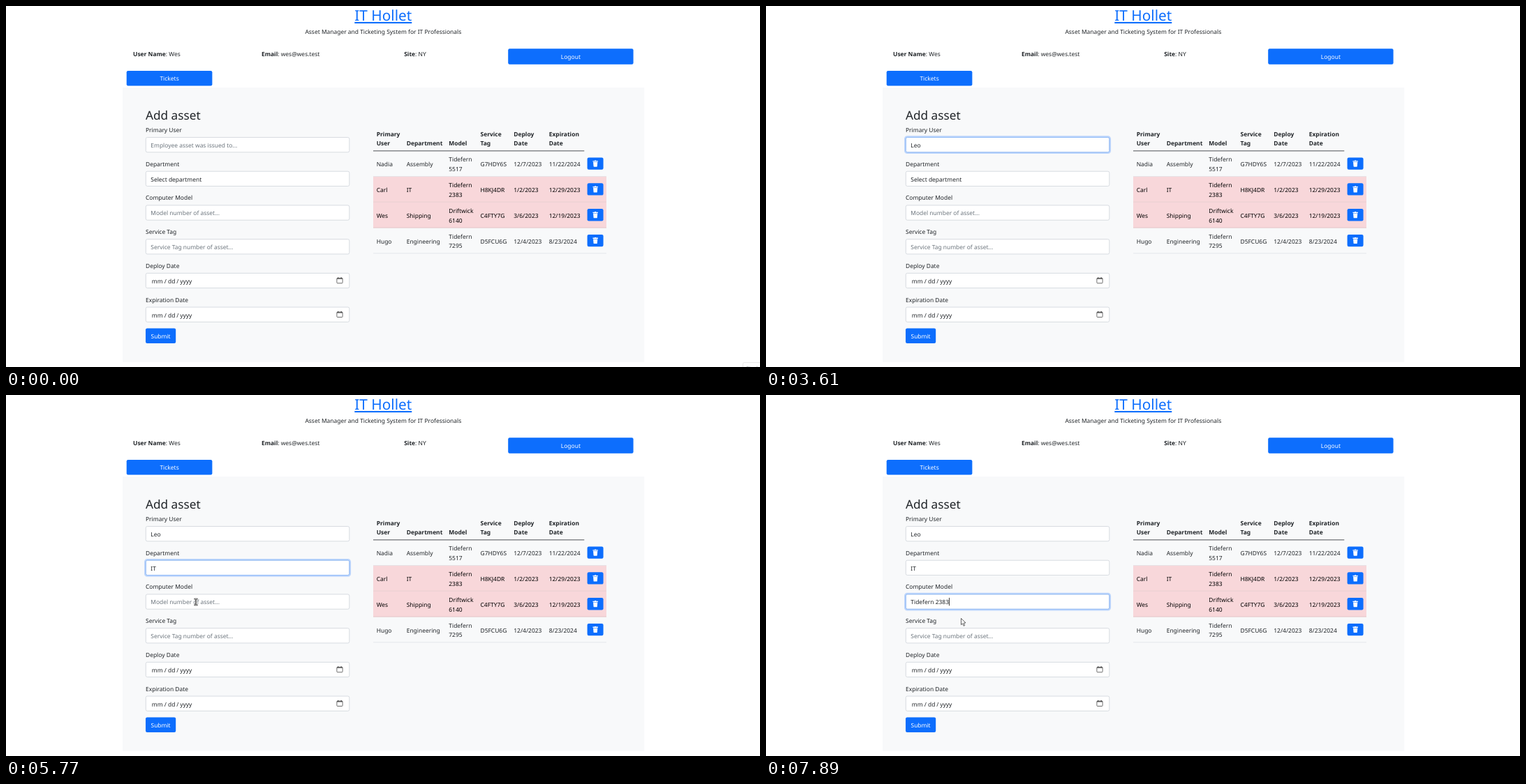
An HTML page for the animation above (8 s loop, 1080 px wide and 518 px high).

```html
<!DOCTYPE html>
<html lang="en">
<head>
<meta charset="utf-8">
<title>Asset form</title>
<style>
  html, body { margin: 0; width: 100%; height: 100%; overflow: hidden; background: #fff; }
  svg { display: block; width: 100vw; height: 100vh; }
  text { font: 8.45px "Noto Sans", "Open Sans", sans-serif; fill: #212529; text-rendering: geometricPrecision; white-space: pre; }
  .bold { font-weight: 700; }
  .mid { text-anchor: middle; }
  .white { fill: #fff; }
  .hint { fill: #6c757d; }
  .black { fill: #000; }
  .title { font-size: 20.8px; fill: #0d6efd; text-decoration: underline; }
  .heading { font-size: 17.2px; }
  .button { fill: #0d6efd; }
  .box { fill: #fff; stroke: #ced4da; stroke-width: .8; }
  .ring rect { fill: none; }
</style>
</head>
<body>
<svg id="stage" viewBox="0 0 1080 518" preserveAspectRatio="none"></svg>
<script>
const LOOP = 8000;
const TYPED_NAME = 'Leo';
const PICKED_MODEL = 'Tidefern 2383';
const stage = document.getElementById('stage');

const text = (x, y, content, cls = '', id = '') =>
  `<text x="${x}" y="${y}" class="${cls}" id="${id}">${content}</text>`;
const rect = (x, y, w, h, attrs = '') =>
  `<rect x="${x}" y="${y}" width="${w}" height="${h}" ${attrs}/>`;
const line = (x1, x2, y, color, w = .8) =>
  `<path d="M${x1} ${y}H${x2}" stroke="${color}" stroke-width="${w}"/>`;
const button = (x, y, w, h, label) =>
  rect(x, y, w, h, 'rx="2.2" class="button"') +
  (label ? text(x + w / 2, y + h / 2 + 3.6, label, 'mid white') : '');

// Form
const fieldTop = i => 188.5 + 48.72 * i;

function field(label, i) {
  const y = fieldTop(i);
  return text(200, y - 7.6, label) +
    rect(200.3, y, 291.5, 21.3, 'rx="2.2" class="box"') +
    `<g class="ring" id="ring${i}" opacity="0">` +
    rect(199.1, y - 1.2, 293.9, 23.7, 'rx="3.2" stroke="#0d6efd" stroke-opacity=".25" stroke-width="2.2"') +
    rect(200.3, y, 291.5, 21.3, 'rx="2.2" stroke="#86b7fe" stroke-width=".8"') + '</g>';
}

function dateParts(i) {
  const y = fieldTop(i) + 14.6, top = fieldTop(i) + 6.1;
  return [['mm', 208.8], ['/', 226.7], ['dd', 232], ['/', 244.3], ['yyyy', 249.2]]
    .map(([part, x]) => text(x, y, part)).join('') +
    rect(473.9, top + .9, 8.2, 7.4, 'rx="1" fill="none" stroke="#4a4a4a" stroke-width=".8"') +
    `<path d="M474 ${top + 1.7}h8M475.8 ${top - .3}v1.4M480.2 ${top - .3}v1.4" stroke="#4a4a4a" stroke-width="1.1"/>`;
}

const form = text(200, 162.5, 'Add asset', 'heading') +
  ['Primary User', 'Department', 'Computer Model', 'Service Tag', 'Deploy Date', 'Expiration Date'].map(field).join('') +
  text(207.3, 203.1, 'Employee asset was issued to...', 'hint', 'nameHint') +
  text(207.3, 203.1, '', '', 'name') +
  text(207.3, 251.7, 'Select department', '', 'department') +
  text(207.3, 300.4, 'Model number of asset...', 'hint', 'modelHint') +
  text(207.3, 300.4, '', '', 'model') +
  text(207.3, 349.2, 'Service Tag number of asset...', 'hint') +
  dateParts(4) + dateParts(5) +
  button(200, 462.4, 43.2, 21.6, 'Submit');

// Asset table
const columns = [530.7, 573.7, 634.3, 679.5, 727.3, 777.7];
const headers = [['Primary', 'User'], ['', 'Department'], ['', 'Model'], ['Service', 'Tag'], ['Deploy', 'Date'], ['Expiration', 'Date']];
const assets = [
  ['Nadia', 'Assembly', 'Tidefern 5517', 'G7HDY6S', '12/7/2023', '11/22/2024'],
  ['Carl', 'IT', PICKED_MODEL, 'H8KJ4DR', '1/2/2023', '12/29/2023', true],
  ['Wes', 'Shipping', 'Driftwick 6140', 'C4FTY7G', '3/6/2023', '12/19/2023', true],
  ['Hugo', 'Engineering', 'Tidefern 7295', 'D5FCU6G', '12/4/2023', '8/23/2024']
];

const trash = (x, y) =>
  `<path transform="translate(${x} ${y})" fill="#fff" d="M-3.7-4h2.4l.5-.7h1.6l.5.7h2.4v1.3h-7.4zM-3.1-2.2h6.2l-.5 6.1q-.1.6-.7.6h-3.8q-.6 0-.7-.6z"/>`;

function assetRow(asset, i) {
  const y = 208 + 36.8 * i, expired = asset[6], cls = expired ? 'black' : '';
  const cells = columns.map((x, c) => {
    if (c !== 2) return text(x, y + 22.3, asset[c], cls);
    const [series, number] = asset[c].split(' ');
    return text(x, y + 15.4, series, cls) + text(x, y + 29, number, cls);
  }).join('');
  return (expired ? rect(526, y, 334, 36.8, 'fill="#f8d7da"') : '') + cells +
    line(526, 860, y + 36.5, expired ? '#dfc2c4' : '#dee2e6') +
    button(832.6, y + 9.5, 23, 17.3) + trash(844.2, y + 18.2);
}

const table = headers.map(([top, bottom], c) =>
    text(columns[c], 186.6, top, 'bold') + text(columns[c], 200.2, bottom, 'bold')).join('') +
  assets.map(assetRow).join('') + line(526, 828.3, 207.9, '#212529');

// Popups and pointer
const options = ['Select department', 'IT', 'Shipping', 'Sales', 'Assembly', 'Purchasing', 'Engineering'];
const optionList = '<g id="optionList">' +
  rect(200.4, 258.9, 291.3, 130.6, 'rx="1" fill="#fff" stroke="#858585" stroke-width=".8"') +
  rect(203, 261.6, 286.5, 17.9, 'fill="#dedfe5" id="optionHover"') +
  options.map((name, i) => text(206.3, 273.8 + 18 * i, name)).join('') + '</g>';

const suggestions = [PICKED_MODEL, 'Driftwick 6140', 'Tidefern 7295'];
const suggestionList = '<g id="suggestionList">' +
  rect(200.5, 309.5, 291.5, 66, 'rx="2.5" fill="#fff" stroke="#c9ccd1" stroke-width=".8"') +
  rect(201.5, 312, 289.5, 19.2, 'fill="#e4e6ea" id="suggestionHover"') +
  suggestions.map((name, i) => text(207.3, 324.8 + 20 * i, name)).join('') + '</g>';

const beamPath = 'M-1.6-4.4H1.6M0-4.4V4.4M-1.6 4.4H1.6';
const pointer = '<g id="pointer"><circle id="press" r="4.6" fill="#f8ee1c"/>' +
  '<path id="arrow" d="M0 0V9.2L2.1 7.3L3.6 10.8L5.2 10.1L3.7 6.7L6.5 6.4Z" fill="#fff" stroke="#222" stroke-width=".7" stroke-linejoin="round"/>' +
  `<g id="beam" fill="none"><path d="${beamPath}" stroke="#333" stroke-width="1.8" stroke-linecap="square"/>` +
  `<path d="${beamPath}" stroke="#fff" stroke-width=".5"/></g></g>`;

stage.innerHTML =
  rect(167, 117, 747.3, 394, 'fill="#f8f9fa"') +
  text(540.3, 20.9, 'IT Hollet', 'title mid') +
  text(540.3, 40.2, 'Asset Manager and Ticketing System for IT Professionals', 'mid') +
  [[182, 'User Name', 'Wes'], [366, 'Email', 'wes@wes.test'], [570.2, 'Site', 'NY']]
    .map(([x, key, value]) => text(x, 72.2, `<tspan class="bold">${key}</tspan>: ${value}`)).join('') +
  button(719.2, 61.2, 179.4, 22.6, 'Logout') +
  button(172.7, 93, 122.7, 21.4, 'Tickets') +
  form + table +
  '<path id="caret" stroke="#111" stroke-width=".8"/>' +
  optionList + suggestionList + pointer +
  '<g id="corner">' + rect(1055.6, 511.6, 40, 20, 'rx="2" fill="#fff" stroke="#dedede" stroke-width=".7"') +
  `<g opacity=".5">${text(1060, 522.5, 'Find', 'hint')}</g></g>`;

const el = Object.fromEntries([...stage.querySelectorAll('[id]')].filter(n => n.id).map(n => [n.id, n]));

// Timeline in milliseconds
const path = [
  [420, 1006, 507], [580, 854, 394], [760, 854, 394], [930, 415, 282], [1100, 415, 282],
  [1250, 348, 238], [1680, 322, 200], [3610, 322, 200], [4250, 241, 252], [4580, 241, 252],
  [4900, 263, 288], [5600, 263, 288], [5770, 272, 297],
  [6920, 272.3, 297.5], [7230, 279.5, 320.5]
];
const focusTimes = [[1980, 4280], [4280, 6180], [6180, LOOP + 500]];
const presses = [[1980, 2130], [4250, 4380], [5260, 5330], [6180, 6330], [6640, 6710], [7770, 7830]];
const caretTimes = [[1980, 2540], [2640, 3610], [4140, 4280], [6180, 7110], [7790, LOOP]];
const keyTimes = [2680, 2860, 3090];

const clamp = v => Math.min(1, Math.max(0, v));
const within = (t, [from, to]) => t >= from && t < to;
const fade = (t, [from, to], ms) => clamp((t - from) / ms) * (1 - clamp((t - to) / ms));
const show = (node, on) => node.setAttribute('opacity', +on);

function pointerAt(t) {
  const next = path.findIndex(key => key[0] > t);
  if (next <= 0) return path[next < 0 ? path.length - 1 : 0].slice(1);
  const [t0, x0, y0] = path[next - 1], [t1, x1, y1] = path[next];
  const k = (t - t0) / (t1 - t0);
  return [x0 + (x1 - x0) * k, y0 + (y1 - y0) * k];
}

function render(t) {
  const [x, y] = pointerAt(t);
  const inField = i => y > fieldTop(i) && y < fieldTop(i) + 21.3;
  const beam = !within(t, [4280, 5630]) && (inField(0) || inField(2));
  const previewing = t >= 6900 && y > 311;

  show(el.corner, t < 30);
  show(el.pointer, t >= 420 && !within(t, [2640, 3640]));
  el.pointer.setAttribute('transform', `translate(${x} ${y})`);
  show(el.arrow, !beam);
  show(el.beam, beam);
  show(el.press, presses.some(p => within(t, p)));
  focusTimes.forEach((span, i) => show(el['ring' + i], fade(t, span, 150)));

  el.name.textContent = TYPED_NAME.slice(0, keyTimes.filter(k => t >= k).length);
  show(el.nameHint, t < keyTimes[0]);
  el.department.textContent = options[t < 5280 ? 0 : 1];
  el.model.textContent = previewing ? PICKED_MODEL : '';
  show(el.modelHint, !previewing);

  show(el.optionList, within(t, [4310, 5300]));
  el.optionHover.setAttribute('y', y > 279.5 ? 279.6 : 261.6);
  show(el.suggestionList, fade(t, [6650, 7780], 100));
  show(el.suggestionHover, previewing);

  const active = t < 4280 ? el.name : el.model;
  const caretX = 207.8 + active.getComputedTextLength();
  el.caret.setAttribute('d', `M${caretX} ${fieldTop(t < 4280 ? 0 : 2) + 5}v11.4`);
  show(el.caret, caretTimes.some(c => within(t, c)));
}

const start = performance.now();
function tick() {
  render((performance.now() - start) % LOOP);
  requestAnimationFrame(tick);
}
tick();
</script>
</body>
</html>
```
